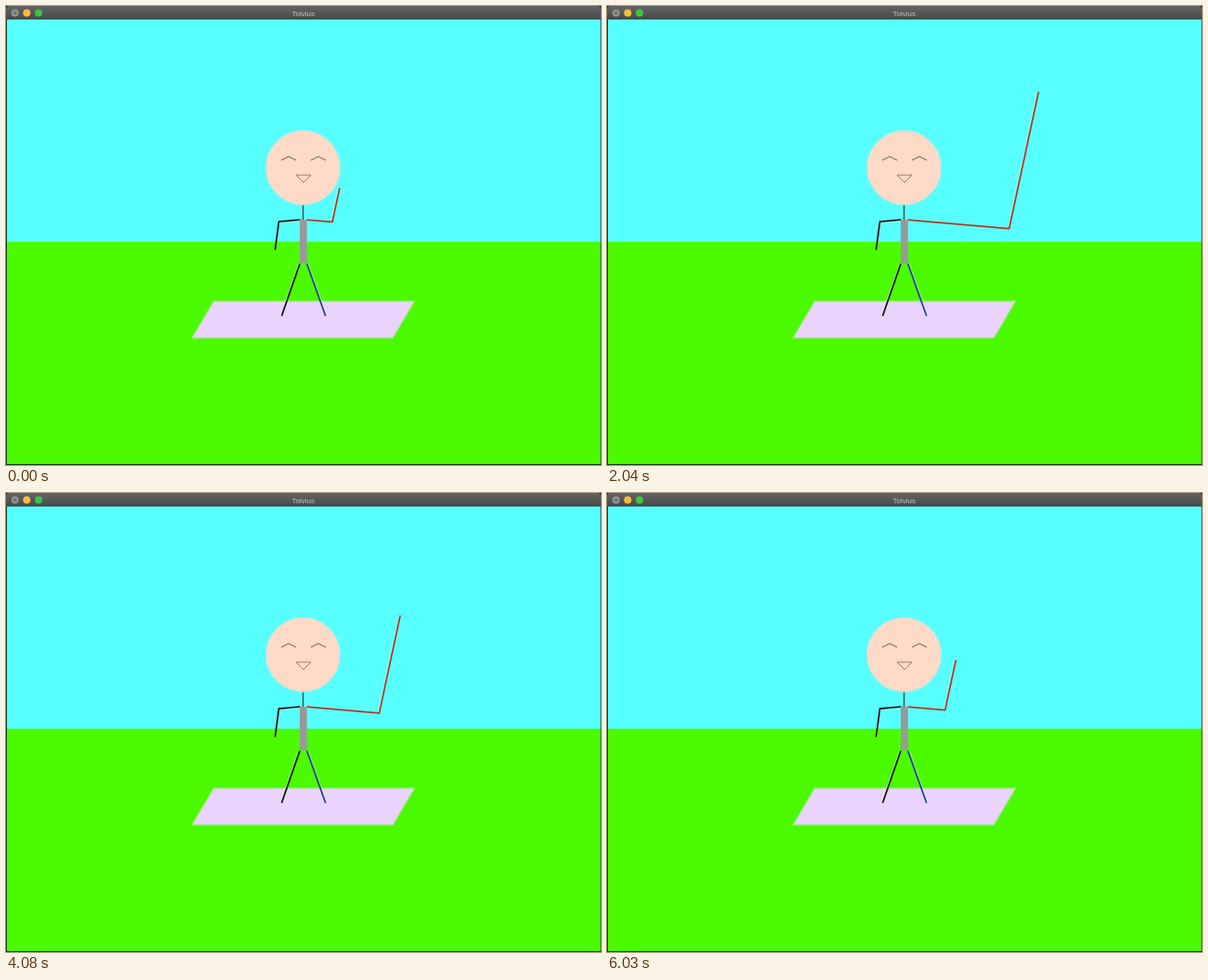
Recreate the animation shown at these times as an HTML page. Size 640 px wide and 494 px high, loop 6060 ms.

```html
<!DOCTYPE html>
<html lang="en">
<head>
<meta charset="utf-8">
<title>Waving figure</title>
<style>
  html, body { margin: 0; width: 100%; height: 100%; overflow: hidden; background: #000; }
  svg { display: block; width: 100%; height: 100%; }
  .title { font: 8px "Liberation Sans", Arial, sans-serif; fill: #c6c6c6; text-anchor: middle; }
  .limb { fill: none; stroke-width: 1.7; stroke-linejoin: round; }
  .halo { fill: none; stroke: #e4eee4; stroke-opacity: .45; stroke-width: 2; }
  .face { fill: none; stroke: #4a3a32; stroke-width: .8; }
</style>
</head>
<body>
<svg viewBox="0 0 640 494">
  <defs>
    <linearGradient id="bar" x2="0" y2="1">
      <stop stop-color="#646464"/>
      <stop offset="1" stop-color="#484848"/>
    </linearGradient>
  </defs>
  <rect width="640" height="494" fill="#183818"/>
  <path d="M0 15V4Q0 0 4 0H636Q640 0 640 4V15Z" fill="url(#bar)"/>
  <rect y="13.5" width="640" height="1" fill="#303838"/>
  <circle cx="9.7" cy="7.5" r="4" fill="#929292"/>
  <path d="M8.2 6l3 3m0-3l-3 3" stroke="#505050" stroke-width=".9"/>
  <circle cx="22.3" cy="7.5" r="4" fill="#f6bd3c"/>
  <circle cx="35" cy="7.5" r="4" fill="#3cc748"/>
  <text class="title" x="319.7" y="10.6">Tolvius</text>

  <rect x="1" y="14.5" width="638.5" height="239.5" fill="#58ffff"/>
  <rect x="1" y="253.7" width="638.5" height="239.3" fill="#4cfa00"/>
  <path d="M223.5 318H439L416 357H200.5Z" fill="#ead4fe" stroke="#b8dfaa" stroke-width="1.4"/>

  <path d="M319.5 213V230" stroke="#263030"/>
  <circle cx="319.5" cy="174" r="39.8" fill="#ffdac6" stroke="#c8e4dc" stroke-width="1.2"/>
  <path class="face" d="M296 166L304 162L312 166M328 166L336 162L344 166"/>
  <path class="face" d="M312 182H328L320 190Z" style="stroke:#8a6250"/>

  <path class="halo" d="M316 231L294 233L290 262M315 278L295.5 333M325 278L344.5 333"/>
  <path class="limb" d="M316.5 230L293.5 232.2L289.5 262.5M316 277.5L296.5 333.5" stroke="#08100c"/>
  <path class="limb" d="M323.7 277.5L343.7 333.5" stroke="#2036a4"/>
  <rect x="316" y="230" width="7.7" height="47" fill="#999"/>
  <path id="armHalo" class="halo" transform="translate(-1.2 -.6)"/>
  <path id="arm" class="limb" stroke="#a43c26"/>
</svg>
<script>
  const LOOP = 6060, STEP = 30;
  // [time in ms, horizontal reach of the elbow]
  const reach = [[0, 27], [1440, 64], [2580, 137.5], [3480, 103.5], [4080, 77.5], [5070, 39.7], [LOOP, 39.7]];
  const arm = document.getElementById("arm");
  const armHalo = document.getElementById("armHalo");

  const rate = i => (reach[i + 1][1] - reach[i][1]) / (reach[i + 1][0] - reach[i][0]);

  // Harmonic mean keeps the curve free of overshoot.
  function slopeAt(i) {
    if (i === 0) return rate(0) * 0.6;
    if (i === reach.length - 1) return 0;
    const a = rate(i - 1), b = rate(i);
    return a * b > 0 ? 2 * a * b / (a + b) : 0;
  }

  function reachAt(t) {
    let i = 0;
    while (i < reach.length - 2 && t >= reach[i + 1][0]) i++;
    const [t0, v0] = reach[i], [t1, v1] = reach[i + 1];
    const span = t1 - t0, u = (t - t0) / span, w = 1 - u;
    return v0 * (1 + 2 * u) * w * w + v1 * u * u * (3 - 2 * u)
      + span * u * w * (slopeAt(i) * w - slopeAt(i + 1) * u);
  }

  function draw(t) {
    const s = reachAt(t);
    const x = 324 + s, y = 230.1 + 0.087 * s;
    const d = `M323.5 230.1L${x} ${y}L${x + 0.291 * s} ${y - 1.356 * s}`;
    arm.setAttribute("d", d);
    armHalo.setAttribute("d", d);
  }

  const start = performance.now();
  function frame() {
    const t = (performance.now() - start) % LOOP;
    draw(Math.floor(t / STEP) * STEP);
    requestAnimationFrame(frame);
  }
  draw(0);
  requestAnimationFrame(frame);
</script>
</body>
</html>
```
